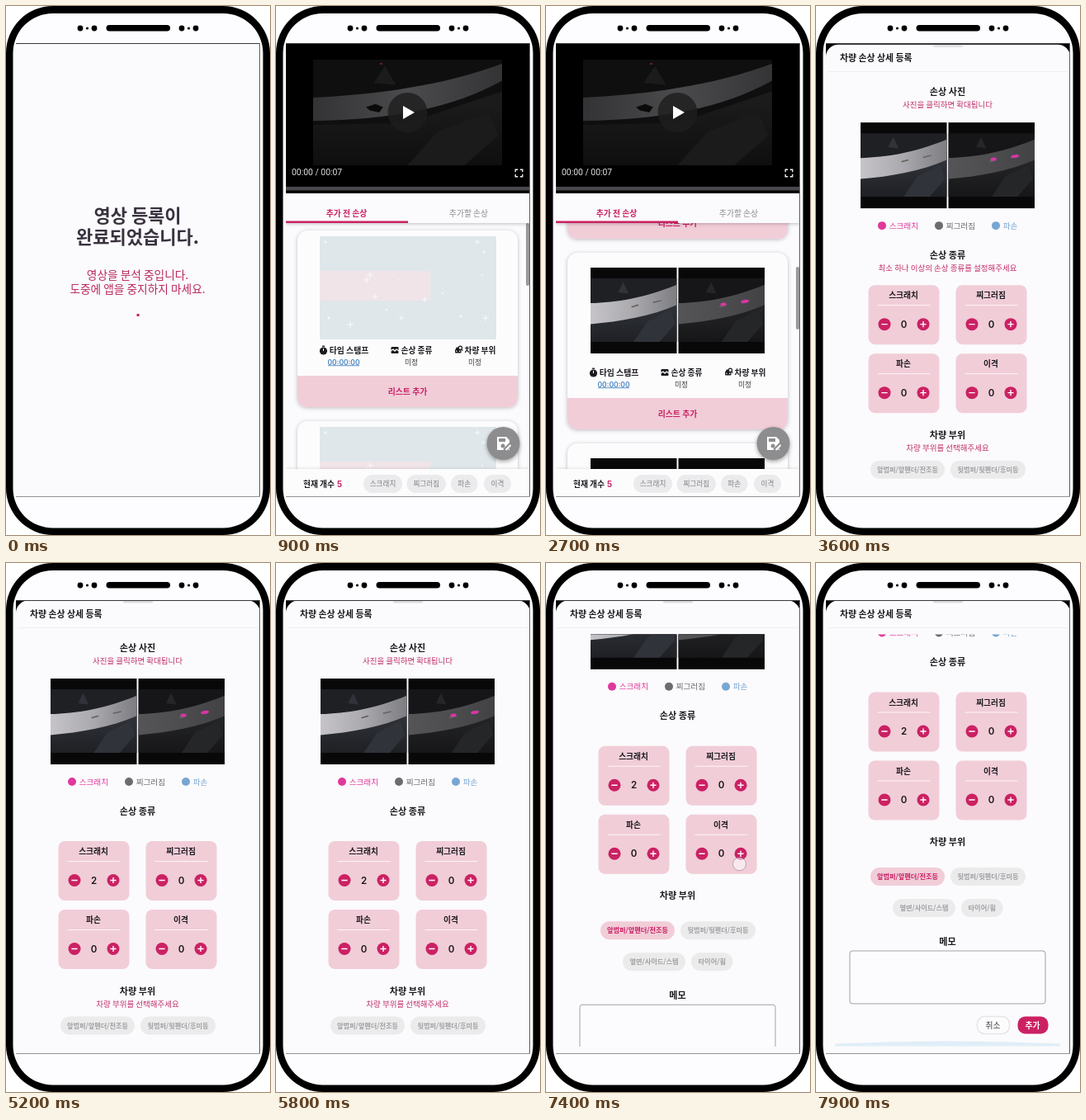
An HTML page with a canvas that plays this animation: 320 px wide and 641 px high, repeating every 8 s.

```html
<!DOCTYPE html>
<html lang="ko">
<head>
<meta charset="utf-8">
<style>
html, body { margin: 0; width: 100%; height: 100%; overflow: hidden; background: #fff; }
canvas { display: block; width: 320px; height: 641px; }
</style>
</head>
<body>
<canvas id="stage"></canvas>
<script>
const W = 320, H = 641, LOOP = 8000;
const canvas = document.getElementById('stage');
const ctx = canvas.getContext('2d');
const dpr = window.devicePixelRatio || 1;
canvas.width = W * dpr;
canvas.height = H * dpr;

const KO = '"Noto Sans CJK KR", "Noto Sans CJK", "Noto Sans CJK JP", sans-serif';
const NUM = 'Inter, sans-serif';
const PINK = '#cb2163', PALE = '#f1cdd8', BG = '#fbfafc', INK = '#1c1a1e';
const LEFT = 12, TOP = 45, WIDE = 296, TALL = 550;

const clamp = v => Math.max(0, Math.min(1, v));
const span = (t, a, b) => clamp((t - a) / (b - a));
const easeInOut = p => (1 - Math.cos(Math.PI * p)) / 2;
const easeOut = p => 1 - (1 - p) ** 3;

function rect(x, y, w, h, color) {
  ctx.fillStyle = color;
  ctx.fillRect(x, y, w, h);
}
function round(x, y, w, h, r, color) {
  ctx.beginPath();
  ctx.roundRect(x, y, w, h, r);
  if (color) { ctx.fillStyle = color; ctx.fill(); }
}
function circle(x, y, r, color) {
  ctx.beginPath();
  ctx.arc(x, y, r, 0, Math.PI * 2);
  ctx.fillStyle = color;
  ctx.fill();
}
function poly(points, color) {
  ctx.beginPath();
  points.forEach(([x, y]) => ctx.lineTo(x, y));
  ctx.closePath();
  ctx.fillStyle = color;
  ctx.fill();
}
function line(points, color, width) {
  ctx.beginPath();
  points.forEach(([x, y], i) => i ? ctx.lineTo(x, y) : ctx.moveTo(x, y));
  ctx.strokeStyle = color;
  ctx.lineWidth = width;
  ctx.stroke();
}
// y is the vertical middle of the glyphs
function text(str, x, y, size, color, weight = 400, align = 'center', font = KO) {
  ctx.font = `${weight} ${size}px ${font}`;
  ctx.textAlign = align;
  ctx.fillStyle = color;
  ctx.fillText(str, x, y + size * (font === KO ? 0.37 : 0.36));
}
function shadow(color, blur, dy) {
  ctx.shadowColor = color;
  ctx.shadowBlur = blur * dpr;
  ctx.shadowOffsetY = dy * dpr;
}
function clipped(x, y, w, h, draw) {
  ctx.save();
  ctx.beginPath();
  ctx.rect(x, y, w, h);
  ctx.clip();
  draw();
  ctx.restore();
}
function fade(x0, y0, x1, y1, colors) {
  const g = ctx.createLinearGradient(x0, y0, x1, y1);
  colors.forEach((c, i) => g.addColorStop(i / (colors.length - 1), c));
  return g;
}

// Edges of the car panel: upper left to right, then lower right to left
const PANELS = {
  spot: [[0, .36], [.34, .33], [.68, .25], [1, .04], [1, .2], [.74, .46], [.41, .57], [0, .58]],
  scratch: [[0, .39], [.3, .38], [.62, .31], [1, .1], [1, .42], [.7, .6], [.35, .68], [0, .72]]
};
function scene(kind, x, y, w, h, tones) {
  clipped(x, y, w, h, () => {
    ctx.translate(x, y);
    ctx.scale(w, h);
    const [dark, low, ...band] = tones;
    rect(0, 0, 1, 1, dark);
    poly([[0, .62], [.5, .6], [1, .3], [1, 1], [0, 1]], fade(0, .4, 0, 1, [low, dark]));
    poly([[.5, 1], [.66, .68], [.93, .5], [.98, .72], [.8, 1]], low);
    poly([[.32, .22], [.38, .06], [.44, .24]], low);
    const p = PANELS[kind];
    ctx.beginPath();
    ctx.moveTo(...p[0]);
    ctx.bezierCurveTo(...p[1], ...p[2], ...p[3]);
    ctx.lineTo(...p[4]);
    ctx.bezierCurveTo(...p[5], ...p[6], ...p[7]);
    ctx.fillStyle = fade(0, 0, 1, 0, band);
    ctx.fill();
    if (kind === 'spot') {
      poly([[.28, .45], [.33, .42], [.37, .45], [.35, .5], [.3, .48]], '#0b0b0c');
      circle(.36, .04, .008, '#702429');
    } else {
      poly([[.47, .44], [.55, .41], [.56, .43], [.48, .46]], '#6b625d');
      poly([[.72, .37], [.82, .34], [.82, .36], [.73, .39]], '#6b625d');
    }
  });
}
function mask(x, y, w, h) {
  ctx.beginPath();
  ctx.ellipse(x, y, w / 2, h / 2, -.15, 0, Math.PI * 2);
  ctx.fillStyle = '#d735a5';
  ctx.fill();
}
function photoPair(kind, y) {
  const bright = kind === 'spot'
    ? ['#19191b', '#2b2c2f', '#747376', '#8d8c90', '#6c6b6f']
    : ['#1e2024', '#30333a', '#c6c4c8', '#aaa9ad', '#7d7d82'];
  const dim = ['#161618', '#252628', '#555457', '#4d4c4f', '#424245'];
  [[54, bright], [160.5, dim]].forEach(([x, tones]) => {
    rect(x, y, 104.5, 104, '#080809');
    scene(kind, x, y + 13, 104.5, 77, tones);
  });
  if (kind === 'spot') {
    mask(200.5, y + 45, 9, 8);
    mask(216, y + 86, 16, 8);
  } else {
    mask(215, y + 44.5, 7.5, 4);
    mask(241, y + 41, 9.5, 4);
  }
}

function analysing() {
  rect(LEFT, TOP, WIDE, TALL, BG);
  text('영상 등록이', 159.5, 253.5, 22, '#39323f', 700);
  text('완료되었습니다.', 159.5, 280, 22, '#39323f', 700);
  text('영상을 분석 중입니다.', 159.5, 326, 13.7, '#b9275f', 500);
  text('도중에 앱을 중지하지 마세요.', 159.5, 343, 13.7, '#b9275f', 500);
  rect(158.5, 373, 3, 3, '#b9275f');
}

function video() {
  rect(LEFT, TOP, WIDE, 182, '#000');
  scene('spot', 45, 65, 229, 128, ['#0f0f10', '#1b1b1c', '#333335', '#4b4a4c', '#343436']);
  circle(159.5, 129, 24, 'rgba(30,30,31,.82)');
  poly([[154, 121], [154, 137], [168, 129]], '#fff');
  text('00:00 / 00:07', 19, 201.5, 10.4, '#e2e2e2', 400, 'left', 'Roboto, sans-serif');
  [[-1, -1], [1, -1], [1, 1], [-1, 1]].forEach(([a, b]) => {
    const x = 294.5 + a * 4.3, y = 202.5 + b * 4.3;
    line([[x - a * 3, y], [x, y], [x, y - b * 3]], '#eee', 1.4);
  });
  rect(LEFT, 219, WIDE, 4.5, '#49484d');
}

function tabs() {
  ctx.save();
  shadow('rgba(0,0,0,.25)', 4, 1);
  rect(LEFT, 227, WIDE, 36, BG);
  ctx.restore();
  text('추가 전 손상', 85.5, 251, 9.8, PINK, 700);
  text('추가할 손상', 233.5, 251, 9.8, '#8b888d');
  rect(LEFT, 260.5, 148, 2.5, PINK);
}

function placeholder(y, t) {
  rect(53, y, 214, 125, '#dfe7eb');
  rect(53, y + 42, 134, 36, '#f0e4e8');
  for (let i = 0; i < 16; i++) {
    const x = 60 + (i * i * 37 + i * 53) % 200;
    const sy = y + 7 + (i * i * 29 + i * 17) % 110;
    const r = 1 + (i * 7 + Math.floor(t / 100)) % 4;
    line([[x - r, sy], [x + r, sy]], '#f7fafb', 1);
    line([[x, sy - r], [x, sy + r]], '#f7fafb', 1);
  }
}

function infoIcons(y) {
  circle(57.5, y + 1, 4.6, INK);
  rect(55.8, y - 5.4, 3.4, 1.3, INK);
  line([[57.5, y + 1], [57.5, y - 2]], '#fff', 1);
  round(139.5, y - 4, 9, 8, 1, INK);
  line([[139, y + 1], [142, y - 1], [144, y + 1], [146, y - 1], [149, y + 1]], '#fff', 1.3);
  round(217, y - 1, 7.5, 4.5, 1, INK);
  poly([[217.6, y - 1], [218.8, y - 3.6], [221, y - 3.6], [221, y - 1]], INK);
  circle(218.8, y + 1.3, .8, '#fff');
  circle(222.6, y + 1.3, .8, '#fff');
  circle(223.4, y - 2.8, 2.1, '#fff');
  ctx.strokeStyle = INK;
  ctx.lineWidth = 1.1;
  ctx.stroke();
  line([[224.8, y - 1.2], [226.4, y + .6]], INK, 1.2);
}

function card(y, i, t) {
  ctx.save();
  shadow('rgba(40,30,45,.28)', 5, 1);
  round(26, y, 267, 214, 12, '#fdfcfd');
  ctx.restore();
  round(26, y + 176, 267, 38, [0, 0, 12, 12], PALE);
  if (t < 1500) placeholder(y + 7, t);
  else photoPair(i % 2 ? 'scratch' : 'spot', y + 18);
  infoIcons(y + 145);
  text('타임 스탬프', 88.5, y + 145, 9.9, INK, 700);
  text('손상 종류', 170.5, y + 145, 9.7, INK, 700);
  text('차량 부위', 247.5, y + 145, 9.7, INK, 700);
  text('00:00:00', 82, y + 159.5, 8.5, '#4a86c2', 600, 'center', NUM);
  rect(63, y + 163.3, 38, .9, '#4a86c2');
  text('미정', 164, y + 159.5, 8.7, '#3a373c', 500);
  text('미정', 241, y + 159.5, 8.7, '#3a373c', 500);
  text('리스트 추가', 159.5, y + 195, 9.9, PINK, 700);
}

function bottomBar() {
  ctx.save();
  shadow('rgba(0,0,0,.1)', 3, -1);
  rect(LEFT, 561, WIDE, 34, '#fdfcfd');
  ctx.restore();
  text('현재 개수', 33, 579, 9.7, INK, 700, 'left');
  text('5', 77, 579, 9.8, PINK, 700, 'center', NUM);
  [['스크래치', 106, 47], ['찌그러짐', 158.5, 47.5], ['파손', 212, 32.5], ['이격', 252, 33]].forEach(([s, x, w]) => {
    round(x, 568, w, 22, 11, '#ebeaec');
    text(s, x + w / 2, 579, 8.6, '#848186', 500);
  });
}

function saveButton() {
  ctx.save();
  shadow('rgba(0,0,0,.35)', 5, 2);
  circle(275.5, 530, 20, '#8d8c8e');
  ctx.restore();
  poly([[268, 522], [279, 522], [283, 526], [283, 538], [268, 538]], '#fff');
  rect(270, 524, 8, 4, '#8d8c8e');
  circle(275, 533, 2.5, '#8d8c8e');
  line([[277, 538.5], [285, 530.5]], '#8d8c8e', 5);
  line([[278.5, 538], [284.5, 532]], '#fff', 2.2);
}

function listPage(t) {
  const scroll = 204 * easeInOut(span(t, 1850, 2500));
  rect(LEFT, TOP, WIDE, TALL, BG);
  clipped(LEFT, 263, WIDE, 298, () => {
    for (let i = 0; i < 3; i++) card(272 + i * 231 - scroll, i, t);
    round(303, 263 + scroll * .26, 4, 76, 2, '#9b9a9d');
  });
  video();
  tabs();
  bottomBar();
  saveButton();
  if (t > 1880 && t < 2360) touch(234.5, 439 - scroll);
}

function knob(x, y, plus) {
  circle(x, y, 7.5, PINK);
  line([[x - 3.6, y], [x + 3.6, y]], '#fff', 1.4);
  if (plus) line([[x, y - 3.6], [x, y + 3.6]], '#fff', 1.4);
}
function counter(x, y, label, n) {
  round(x, y, 86, 72, 8, PALE);
  text(label, x + 42.5, y + 12.5, 9.7, INK, 700);
  rect(x + 11, y + 24, 64, 1, '#fdf5f8');
  knob(x + 19.5, y + 47.5, false);
  text(n, x + 43, y + 47.5, 11.5, INK, 600, 'center', NUM);
  knob(x + 66.5, y + 47.5, true);
}
function chip(str, x, y, w, on) {
  round(x, y - 11, w, 22, 11, on ? PALE : '#ebebec');
  text(str, x + w / 2, y, 8.2, on ? PINK : '#a19fa3', 700);
}
function section(title, y, hint) {
  text(title, 159.5, y, 11.1, INK, 700);
  if (hint) text(hint, 159.5, y + 16, 9.5, '#c02f6a', 500);
}

function sheetBody(t) {
  const count = t < 4400 ? 0 : t < 4900 ? 1 : 2;
  const picked = t >= 6850;
  section('손상 사진', 102.5, '사진을 클릭하면 확대됩니다');
  photoPair('scratch', 140);
  [['스크래치', 80, '#e0389c'], ['찌그러짐', 149, '#6c6b6d'], ['파손', 218, '#78a6d2']].forEach(([s, x, c]) => {
    circle(x, 265, 5, c);
    text(s, x + 8.7, 265, 9.6, c, 500, 'left');
  });
  section('손상 종류', 300.5, count ? '' : '최소 하나 이상의 손상 종류를 설정해주세요');
  ['스크래치', '찌그러짐', '파손', '이격'].forEach((s, i) => {
    counter(63.5 + i % 2 * 106, 337 + (i >> 1) * 83, s, i ? 0 : count);
  });
  section('차량 부위', 518.5, picked ? '' : '차량 부위를 선택해주세요');
  chip('앞범퍼/앞펜더/전조등', 66, 560.5, 90, picked);
  chip('뒷범퍼/뒷펜더/후미등', 163, 560.5, 91, false);
  chip('옆면/사이드/스텝', 93, 598.5, 76, false);
  chip('타이어/휠', 176, 598.5, 50.5, false);
  section('메모', 639.5);
  round(41, 650.5, 237, 64, 3, '#fcfbfd');
  ctx.strokeStyle = '#a3a1a5';
  ctx.lineWidth = 1;
  ctx.stroke();
  round(195.5, 730, 39, 21, 9, '#fdfcfd');
  ctx.strokeStyle = '#e7e4ea';
  ctx.lineWidth = 1.5;
  ctx.stroke();
  text('취소', 214.5, 740.5, 9.8, '#3b383d', 500);
  round(244.5, 730, 37, 21, 9, PINK);
  text('추가', 262.5, 740.5, 9.8, '#fff', 700);
}

function sheet(t) {
  const p = easeOut(span(t, 3150, 3667));
  if (!p) return;
  const scroll = 34 * easeInOut(span(t, 5900, 6500)) + 146.5 * easeInOut(span(t, 7000, 7750));
  rect(LEFT, TOP, WIDE, TALL, `rgba(0,0,0,${.54 * p})`);
  ctx.save();
  ctx.translate(0, TALL * (1 - p));
  round(LEFT, 45.5, WIDE, 549.5, [15, 15, 0, 0], BG);
  round(142, 46, 36, 2.5, 1.2, '#dededf');
  text('차량 손상 상세 등록', 29, 61.5, 10.9, INK, 700, 'left');
  rect(14, 78, 293, 1, '#efedf0');
  clipped(LEFT, 86.5, WIDE, 499.5, () => {
    ctx.translate(0, -scroll);
    sheetBody(t);
  });
  const glow = span(t, 7650, 7850);
  if (glow) {
    ctx.beginPath();
    ctx.moveTo(23, 585.5);
    ctx.lineTo(23, 582.5);
    ctx.quadraticCurveTo(159.5, 576.5, 296, 582.5);
    ctx.lineTo(296, 585.5);
    ctx.fillStyle = `rgba(205,230,246,${.6 * glow})`;
    ctx.fill();
  }
  ctx.restore();
  if (t > 6020 && t < 6380) touch(234.5, 440 - scroll);
  if (t > 7080 && t < 7480) touch(234.5, 480 - scroll);
}

function touch(x, y) {
  circle(x, y, 8, 'rgba(255,255,255,.55)');
  ctx.strokeStyle = 'rgba(120,115,125,.5)';
  ctx.lineWidth = 1;
  ctx.stroke();
}
const TAPS = [[3000, 180, 494], [4350, 130, 384.5], [4850, 130, 384.5], [6800, 110, 526.5]];

function phone() {
  ctx.beginPath();
  ctx.rect(0, 0, W, H);
  ctx.roundRect(0, 0, W, H, 57);
  ctx.fillStyle = '#fff';
  ctx.fill('evenodd');
  ctx.beginPath();
  ctx.roundRect(0, 0, W, H, 57);
  ctx.roundRect(8.5, 9, 303, 623.5, 48);
  ctx.fillStyle = '#000';
  ctx.fill('evenodd');
  round(121.5, 23, 77.5, 7.5, 3.75, '#000');
  [90, 107, 213, 230].forEach(x => circle(x, 27, 3.4, '#000'));
  [98.5, 221.5].forEach(x => circle(x, 27, 1.6, '#000'));
  rect(LEFT, TOP, WIDE, 1, '#38363a');
  rect(307, TOP, 1, TALL, '#5f5d62');
  rect(LEFT, 594, WIDE, 1, '#949297');
}

function frame() {
  const t = performance.now() % LOOP;
  ctx.setTransform(dpr, 0, 0, dpr, 0, 0);
  rect(0, 0, W, H, '#fdfcfe');
  clipped(LEFT, TOP, WIDE, TALL, () => {
    if (t < 500) analysing();
    else {
      if (t < 3700) listPage(t);
      else rect(LEFT, TOP, WIDE, TALL, '#000');
      sheet(t);
    }
    TAPS.forEach(([at, x, y]) => {
      if (t >= at - 40 && t < at + 90) touch(x, y);
    });
  });
  phone();
  requestAnimationFrame(frame);
}
frame();
</script>
</body>
</html>
```
